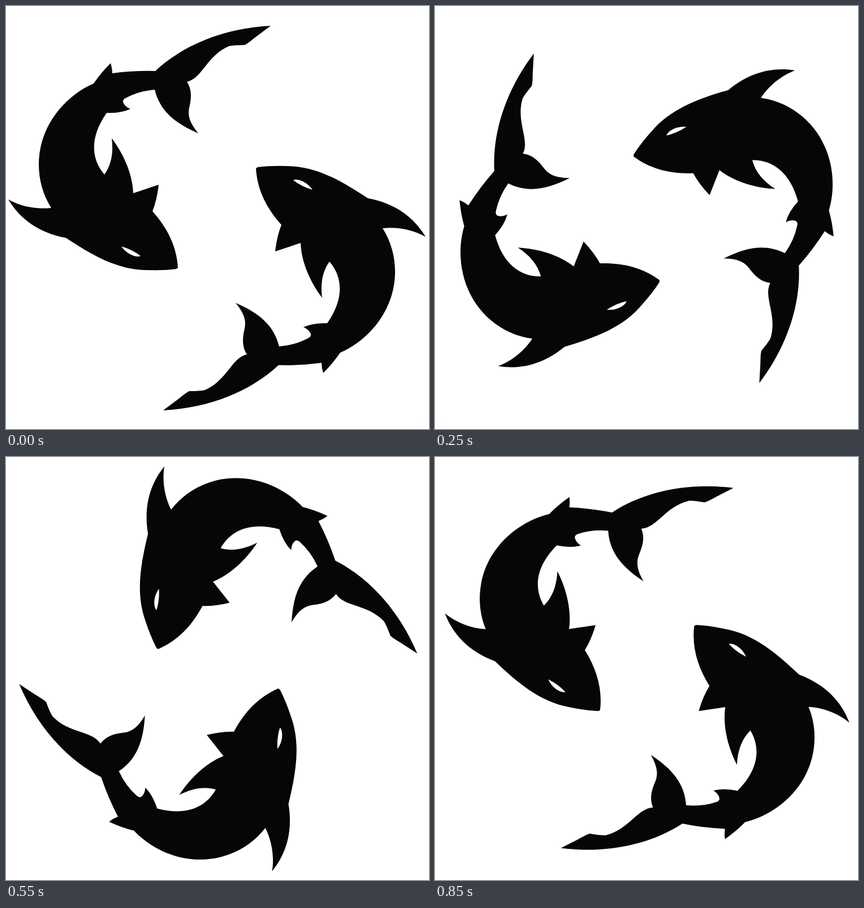
Write an HTML page that moves like this. It is 748 by 748 pixels and loops after 900 ms.

```html
<!DOCTYPE html>
<html lang="en">
<head>
<meta charset="utf-8">
<title>Circling sharks</title>
<style>
  html, body { margin: 0; width: 100%; height: 100%; overflow: hidden; background: #fff; }
  svg { display: block; width: 100vw; height: 100vh; }
</style>
</head>
<body>
<svg viewBox="0 0 748 748">
  <g id="pair" fill="#060606" fill-rule="evenodd">
    <path id="shark" d="
      M468,35 C386,39 313,69 264,115 Q226,114 188,119
      Q188,110 185,101 Q168,118 155,137
      C104,159 58,213 58,280 C58,307 65,333 80,357
      C55,360 27,355 4,342 C25,377 58,401 106,410
      C150,439 196,467 250,467 Q278,468 301,465 L304,463
      C302,425 285,392 259,363 Q267,343 270,316 L225,331
      C224,299 209,263 187,234 C190,258 187,280 174,298
      C150,270 148,232 178,189 Q203,190 220,182
      Q210,178 207,170 Q206,166 211,163 Q235,150 263,148
      C272,185 298,207 340,225 C325,207 321,194 324,180
      C328,163 329,148 320,134 C347,128 355,88 394,71
      Q402,69 422,69 Q428,66 440,56 Z
      M204,425 Q224,431 238,442 C232,445 215,441 204,425 Z"/>
    <use href="#shark" transform="rotate(180 373 375)"/>
  </g>
</svg>
<script>
  const LOOP = 900, STEP = 50, DEGREES = 10;
  const pair = document.getElementById("pair");

  function draw() {
    const step = Math.floor(performance.now() % LOOP / STEP);
    pair.setAttribute("transform", `rotate(${-DEGREES * step} 374 374)`);
    requestAnimationFrame(draw);
  }
  draw();
</script>
</body>
</html>
```
